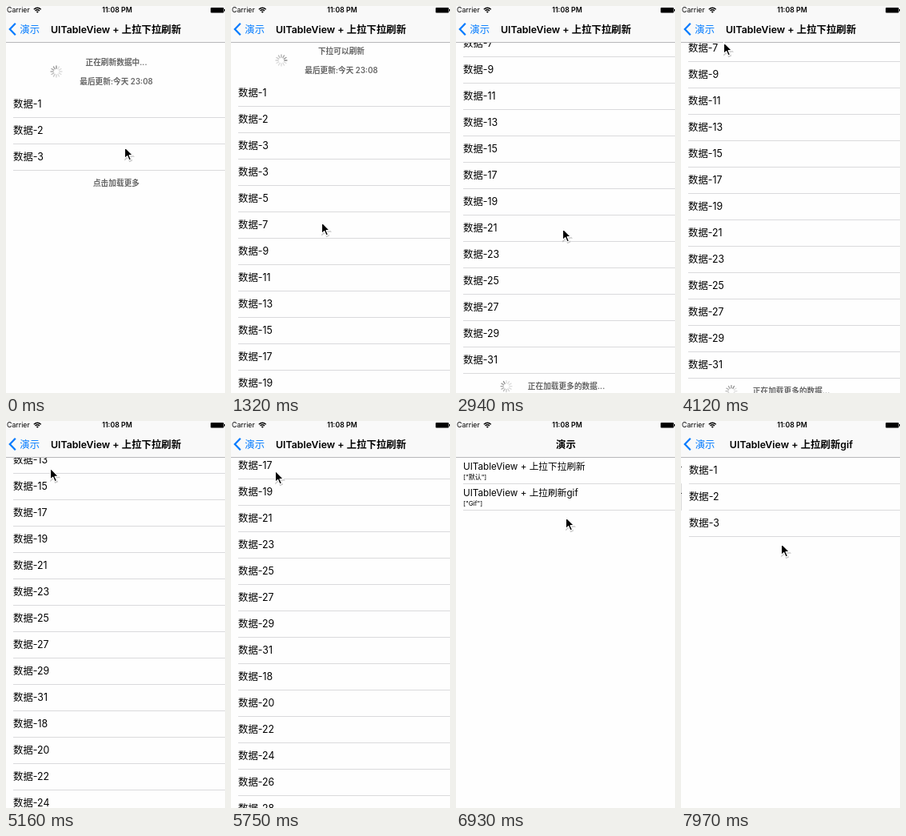
Animation of 274x484 px, one loop 8 s. Source, as an HTML page:

```html
<!DOCTYPE html>
<html lang="zh">
<head>
<meta charset="utf-8">
<title>Table refresh</title>
<style>
  html, body { margin: 0; width: 100%; height: 100%; overflow: hidden; background: #fefefe; }
  svg { display: block; width: 100vw; height: 100vh; }
  text { font-family: Inter, "Noto Sans CJK SC", "Noto Sans CJK", sans-serif; font-size: 12.4px; white-space: pre; }
  .status { font-size: 8.8px; }
  .title { font-weight: 600; text-anchor: middle; }
  .hint { font-size: 9.7px; font-weight: 600; fill: #666; text-anchor: middle; }
  .cell { font-size: 11.7px; }
  .detail { font-size: 8px; }
</style>
</head>
<body>
<svg id="stage" viewBox="0 0 274 484"></svg>
<script>
const LOOP = 8000, STEP = 147.4, W = 274, H = 484, ROW = 33;
const BLUE = '#007aff', PAPER = '#fefefe';
const stage = document.getElementById('stage');

function add(parent, tag, attrs = {}, text) {
  const el = document.createElementNS('http://www.w3.org/2000/svg', tag);
  for (const key in attrs) el.setAttribute(key, attrs[key]);
  if (text) el.textContent = text;
  parent.appendChild(el);
  return el;
}
const rect = (p, x, y, width, height, fill) => add(p, 'rect', { x, y, width, height, fill });
const label = (p, x, y, text, cls = '') => add(p, 'text', { x, y, class: cls }, text);
const move = (el, x, y = 0) => el.setAttribute('transform', `translate(${x} ${y})`);
const show = (el, on) => el.setAttribute('display', on ? 'inline' : 'none');
const fade = (el, v) => el.setAttribute('opacity', v);

// Linear track through [time, ...values] keys
function track(keys, t) {
  let i = 0;
  while (i < keys.length - 2 && t >= keys[i + 1][0]) i++;
  const a = keys[i], b = keys[i + 1];
  const p = Math.min(1, Math.max(0, (t - a[0]) / (b[0] - a[0])));
  return a.slice(1).map((v, n) => v + (b[n + 1] - v) * p);
}
const easeOut = (t, start, span) => 1 - (1 - Math.min(1, Math.max(0, (t - start) / span))) ** 3;

function makePage() {
  const g = add(stage, 'g');
  rect(g, 0, 0, W, H, PAPER);
  return g;
}

// Cell centred on y = 0
function makeRow(parent, i, value) {
  const g = add(parent, 'g');
  label(g, 9, 4.5, '数据-' + value);
  rect(g, 9, 17, W - 9, 1, '#dadadc');
  move(g, 0, i * ROW);
  return g;
}

function makeSpinner(parent, x, y) {
  const g = add(parent, 'g');
  move(g, x, y);
  const spokes = Array.from({ length: 12 }, (_, i) => add(g, 'line', {
    y1: -3.8, y2: -7, 'stroke-width': 1.3, 'stroke-linecap': 'round', stroke: '#666',
    transform: `rotate(${i * 30})`
  }));
  const spin = t => {
    const head = Math.floor(t / 1000 * 12);
    spokes.forEach((s, i) => fade(s, 0.22 + 0.55 * Math.max(0, 1 - ((head - i + 24) % 12) / 7)));
  };
  return { g, spin };
}

// Menu page
const menu = makePage();
const pressed = rect(menu, 0, 79, W, 32, '#d9d9d9');
[['上拉下拉刷新', '默认'], ['上拉刷新gif', 'Gif']].forEach(([name, kind], i) => {
  const y = 57 + i * ROW;
  label(menu, 9, y + 4.3, 'UITableView + ' + name, 'cell');
  label(menu, 9, y + 16, `["${kind}"]`, 'detail');
  rect(menu, 9, y + 21, W - 9, 1, '#dadadc');
});

// Refreshing list page
const listPage = makePage();
const list = add(listPage, 'g');
const state = label(list, 138, -48.5, '', 'hint');
label(list, 138, -24.5, '最后更新:今天 23:08', 'hint');
const topSpin = makeSpinner(list, 63, -40);
const rowValue = i => i < 3 ? i + 1 : i < 18 ? 2 * i - 3 : 2 * i - 18;
const rows = Array.from({ length: 32 }, (_, i) => makeRow(list, i, rowValue(i)));
const footer = add(list, 'g');
const footText = label(footer, 138, 3.8, '', 'hint');
const footSpin = makeSpinner(footer, 63, 0);

// Plain list page
const plainPage = makePage();
const plain = add(plainPage, 'g');
for (let i = 0; i < 3; i++) makeRow(plain, i, i + 1);
move(plain, 0, 61);

// Navigation and status bars
rect(stage, 0, 0, W, 45, '#f9f9f9');
rect(stage, 0, 45, W, 1, '#b8b8ba');
const menuTitle = label(stage, 137.5, 33.6, '演示', 'title');
const listTitle = label(stage, 137.5, 33.6, 'UITableView + 上拉下拉刷新', 'title');
const plainTitle = label(stage, 137.5, 33.6, 'UITableView + 上拉刷新gif', 'title');
const back = add(stage, 'g');
add(back, 'path', { d: 'M11.8 21.8 L4.8 29 L11.8 36.2', fill: 'none', stroke: BLUE, 'stroke-width': 2.2 });
const backText = label(back, 17.3, 33.6, '演示');
backText.setAttribute('fill', BLUE);

label(stage, 1, 8.3, 'Carrier', 'status');
const clock = label(stage, 139, 8.3, '11:08 PM', 'status');
clock.setAttribute('font-weight', 600);
clock.setAttribute('text-anchor', 'middle');
add(stage, 'path', {
  d: 'M34.8 4.2 Q39.3 0.2 43.8 4.2 M36.5 6 Q39.3 3.5 42.1 6', fill: 'none', stroke: '#000', 'stroke-width': 1.3
});
add(stage, 'path', { d: 'M37.7 7 Q39.3 5.8 40.9 7 L39.3 8.8 Z' });
add(stage, 'rect', { x: 256, y: 2, width: 16.5, height: 6.5, rx: 1 });
rect(stage, 273, 4, 1, 2.5, '#000');

const cursor = add(stage, 'g');
const arrow = 'M0.5 0.5 V14.6 L3.7 11.6 L6.1 17 L8.6 15.9 L6.2 10.7 H10.6 Z';
add(cursor, 'path', { d: arrow, transform: 'translate(.6 1.2)', fill: '#000', opacity: 0.2, stroke: '#000', 'stroke-width': 1.6 });
add(cursor, 'path', { d: arrow, stroke: '#fff', 'stroke-width': 1.2, 'stroke-linejoin': 'round' });

const REFRESHED = 1300, LOADING = 2600, LOADED = 4350, POP = 6200, PRESS = 7360, PUSH = 7450;
const scrollKeys = [
  [0, 122], [1180, 122], [1326, 108], [1474, 73], [1621, 61], [2360, 61], [2506, 18], [2653, -58],
  [2800, -104], [2948, -119], [3095, -119], [3390, -113], [4564, -113], [4716, -124], [5011, -186],
  [5306, -246], [5600, -272], [5748, -275]
];
const cursorKeys = [
  [0, 148, 176], [300, 148, 178], [1180, 117, 261], [1326, 113, 270], [1621, 115, 274], [2211, 133, 278],
  [3095, 133, 278], [3537, 92, 160], [3832, 62, 76], [4127, 53, 45], [4422, 54, 35], [4564, 54, 35],
  [4864, 55, 52], [5306, 55, 62], [5748, 55, 62], [6043, 34, 30], [6338, 30, 26], [6633, 78, 76],
  [6928, 137, 120], [7222, 131, 96], [7517, 128, 96], [7812, 125, 140], [7960, 125, 153]
];

function render(now) {
  const t = Math.floor((now % LOOP + 10) / STEP) * STEP;
  const count = t < REFRESHED ? 3 : t < LOADED ? 18 : 32;
  const loading = t >= LOADING && t < LOADED;
  const pop = easeOut(t, POP, 600), push = easeOut(t, PUSH, 600);

  move(list, 0, Math.round(track(scrollKeys, t)[0]));
  rows.forEach((row, i) => show(row, i < count));
  state.textContent = t < REFRESHED ? '正在刷新数据中...' : '下拉可以刷新';
  show(topSpin.g, t < 1600);
  topSpin.spin(t);
  move(footer, 0, count * ROW + (loading ? 0.6 : 0));
  footText.textContent = loading ? '正在加载更多的数据...' : '点击加载更多';
  show(footSpin.g, loading);
  footSpin.spin(t);

  const away = push > 0 ? push : 1 - pop;
  move(menu, -82 * away);
  move(listPage, W * pop);
  move(plainPage, W * (1 - push));
  show(listPage, pop < 1);
  show(plainPage, push > 0);
  show(pressed, t >= PRESS);

  move(menuTitle, -108 * away);
  fade(menuTitle, (1 - away) ** 2);
  move(listTitle, 137 * pop);
  fade(listTitle, (1 - pop) ** 2);
  move(plainTitle, 137 * (1 - push));
  fade(plainTitle, push ** 2);
  fade(back, away ** 2);
  move(backText, 108 * (1 - away));

  move(cursor, ...track(cursorKeys, t));
}

function frame() {
  render(performance.now());
  requestAnimationFrame(frame);
}
frame();
</script>
</body>
</html>
```
